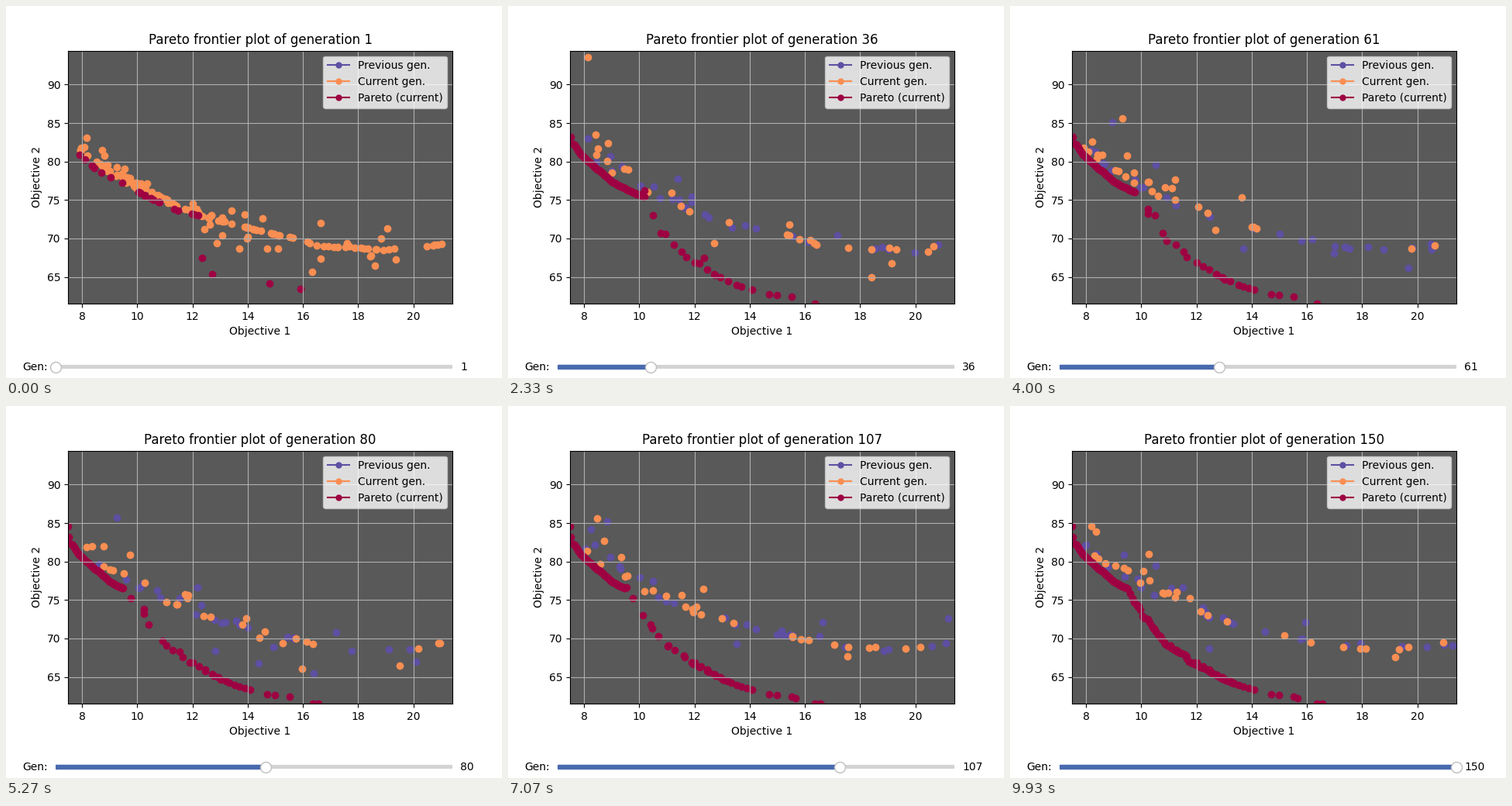
A matplotlib script that plays this animation: 640 by 480 pixels, repeating every 9990 ms.

```python
import numpy as np
import matplotlib.pyplot as plt
from matplotlib.animation import FuncAnimation
from matplotlib.lines import Line2D
from matplotlib.widgets import Slider

GENS = 150
LOOP_MS = 9990
END = GENS + 1
GOLDEN = 0.618034
rng = np.random.default_rng(11)

# Key points of the curves in objective space
FIRST = np.array([(7.78, 81.3), (8.6, 78.7), (9.5, 77.2), (10.2, 75.7),
                  (11.4, 73.7), (12.3, 72.9)])
DENSE = np.array([(7.6, 82.4), (7.92, 80.8), (8.17, 80.05), (8.4, 79.2),
                  (8.68, 78.5), (8.96, 77.5), (9.24, 76.9), (9.9, 75.8),
                  (10.2, 75.4)])
TAIL = np.array([(9.5, 76.4), (9.75, 74.5), (9.93, 73.8), (10.03, 72.7),
                 (10.25, 72.4), (10.36, 71.6), (10.87, 69.2), (11.37, 68.1),
                 (11.6, 67.8), (11.7, 67), (12.27, 66.1), (12.97, 64.7),
                 (13.53, 63.9), (14.1, 63.3), (14.75, 62.7), (15.5, 62.45),
                 (16.4, 61.5)])
TRAIL = np.array([(7.6, 82.6), (8.2, 80.6), (9, 78.5), (10, 76.4),
                  (11, 74.7), (12, 73.2), (13, 72.2), (14, 71.4), (15, 70.5),
                  (15.5, 70.2), (16.5, 69.1), (17, 68.9), (19, 68.5),
                  (20, 68.6), (21.4, 69.5)])


def along(curve, x):
    return np.column_stack([x, np.interp(x, curve[:, 0], curve[:, 1])])


# Pareto members live from a birth to a death generation
members, births, deaths = [], [], []


def cohort(points, born, died):
    n = len(points)
    members.append(points)
    births.append(np.broadcast_to(born, n))
    deaths.append(np.broadcast_to(died, n))


def first_front():
    n = 23
    cohort(along(FIRST, np.sort(rng.uniform(7.78, 12.3, n))),
           1, rng.integers(3, 20, n))
    cohort(np.array([(12.35, 67.5), (12.72, 65.35), (14.78, 64.15),
                     (15.9, 63.45)]), 1, np.array([50, 120, 9, 14]))


def dense_front():
    """Fill the left part early; its right end is dominated later."""
    x = np.linspace(7.62, 10.2, 84)
    died = np.where(x > 9.5, 38 + 55 * (10.2 - x), END)
    cohort(along(DENSE, x), rng.integers(2, 34, len(x)), died)
    cohort(np.array([(7.53, 83.2), (7.49, 84.6)]), np.array([10, 70]), END)


def tail_front():
    """Members appear slowly, then quickly; early ones lie above the tail."""
    i = np.arange(95)
    born = np.interp(i, [0, 12, 18, 26, 36, 48, 94],
                     [3, 36, 61, 80, 107, 130, 149])
    low = np.interp(born, [36, 80], [10.2, 9.5])
    x = low + (13.4 - low) * (i * GOLDEN % 1)
    points = along(TAIL, x)
    lift = 5 * np.exp(10 - x - born / 40)
    points[:, 1] += lift
    cohort(points, born, np.where(lift > 0.35, born + 45, END))

    x = np.array([13.52, 13.7, 14.1, 14.72, 14.98, 15.52, 16.36,
                  13.9, 16.55, 15.66])
    born = np.append(rng.integers(3, 30, 7), [50, 70, 90])
    cohort(along(TAIL, x), born, END)


first_front()
dense_front()
tail_front()
members = np.vstack(members)
births = np.concatenate(births)
deaths = np.concatenate(deaths)


def front(gen):
    return members[(births <= gen) & (gen < deaths)]


def offspring(gen):
    """Dominated points on and above the trail, with some strays."""
    n = int(30 + 115 * np.exp(-(gen - 1) / 4))
    edges = np.array([7.9, 10.2, 12.4, 16.5, 21.3])
    zone = rng.choice(4, n, p=[0.3, 0.2, 0.28, 0.22])
    points = along(TRAIL, rng.uniform(edges[zone], edges[zone + 1]))
    spread = 1.4 - 0.9 * np.exp(-(gen - 1) / 10)
    scale = np.array([1.0, 0.7, 0.08, 0.12])
    points[:, 1] += rng.exponential(scale[zone] * spread)
    stray = (rng.random(n) < 0.28) & (zone > 1)
    points[stray, 1] += rng.triangular(-5, -0.8, 4, stray.sum())
    return points


population = {g: offspring(g) for g in range(1, END)}

# Figure
spectral = plt.get_cmap("Spectral")
SERIES = [("Previous gen.", spectral(1.0)),
          ("Current gen.", spectral(0.25)),
          ("Pareto (current)", spectral(0.0))]

fig, ax = plt.subplots(figsize=(6.4, 4.8), dpi=100)
fig.subplots_adjust(left=0.125, right=0.9, bottom=0.2, top=0.88)
ax.set_facecolor("0.35")
ax.set(xlim=(7.495, 21.412), ylim=(61.536, 94.406),
       xlabel="Objective 1", ylabel="Objective 2")
ax.grid(True)
dots = [ax.scatter([], [], color=[c], linewidths=1) for _, c in SERIES]
ax.legend(handles=[Line2D([], [], color=c, marker="o", markersize=5,
                          label=name) for name, c in SERIES],
          loc="upper right")

slider = Slider(fig.add_axes([0.1, 0.02, 0.8, 0.02]), "Gen:", 1, GENS,
                valinit=1, valstep=1, valfmt="%d", initcolor="none",
                color=spectral(0.95))
slider.drawon = False


def update(frame):
    gen = frame + 1
    previous = population.get(gen - 1, np.empty((0, 2)))
    for dot, points in zip(dots, (previous, population[gen], front(gen))):
        dot.set_offsets(points)
    ax.set_title(f"Pareto frontier plot of generation {gen}")
    slider.set_val(gen)
    return dots


anim = FuncAnimation(fig, update, frames=GENS, interval=LOOP_MS / GENS,
                     repeat=True, repeat_delay=0, blit=False)
plt.show()
```
